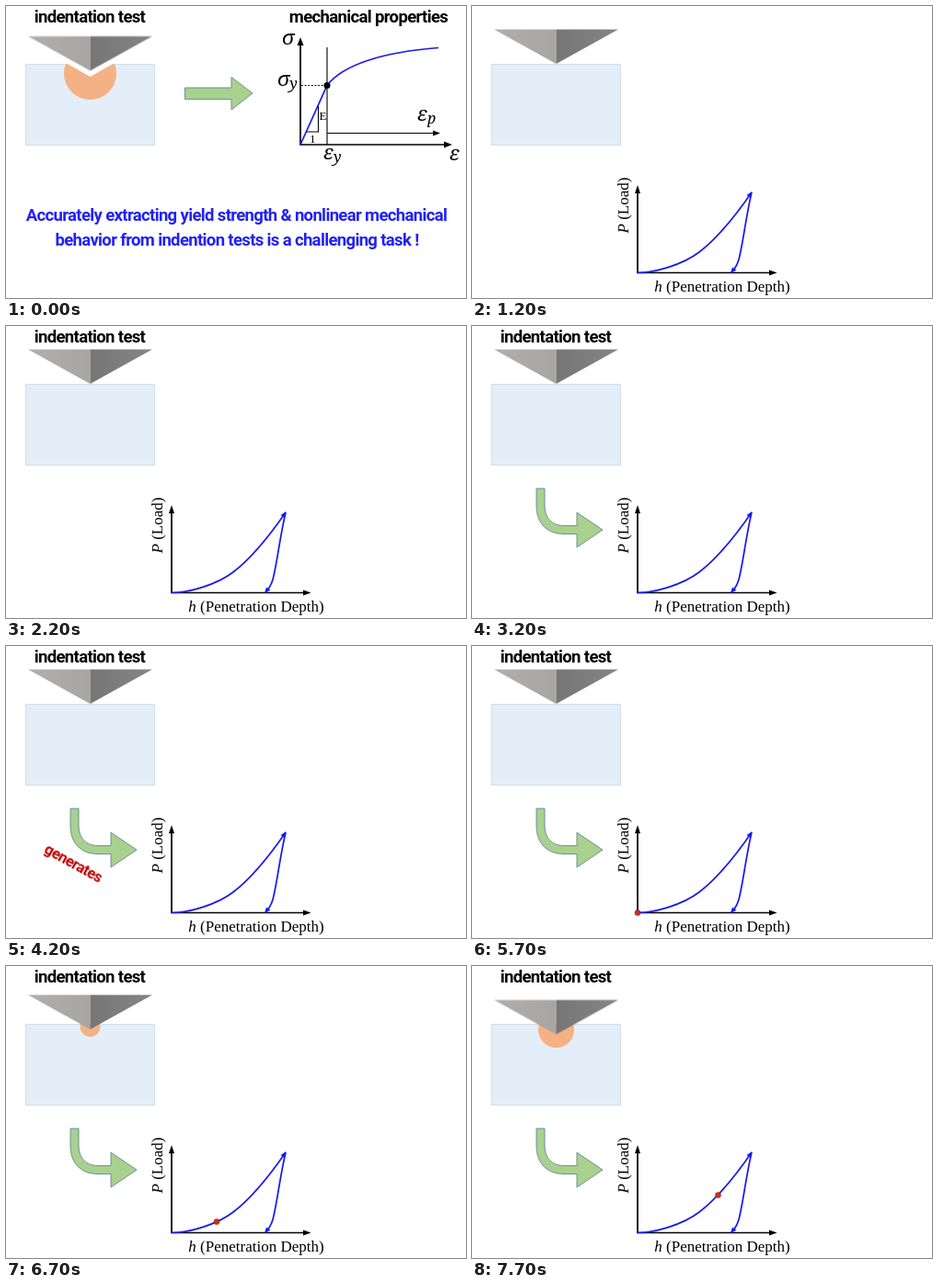
Animation, 500 px wide and 318 px high, one loop 8 s. Source, as an HTML page:

```html
<!DOCTYPE html>
<html lang="en">
<head>
<meta charset="utf-8">
<title>Indentation test</title>
<style>
  html, body { margin: 0; width: 100%; height: 100%; overflow: hidden; background: #fff; }
  svg { display: block; width: 100%; height: 100%; }
  .head { font: 700 18.5px Roboto, sans-serif; letter-spacing: -.035em; text-anchor: middle; }
  .claim { fill: #2121f5; }
  .red { font-size: 16.5px; fill: #c00000; }
  .serif { font: 17px "Liberation Serif", serif; text-anchor: middle; }
  .math { font: italic 22px "Noto Serif", serif; }
  .sub { font-size: 16px; }
  .small { font: 13px "Liberation Serif", serif; }
  .axis { fill: none; stroke: #000; stroke-width: 1.7; }
  .thin { fill: none; stroke: #000; stroke-width: 1.1; }
  .blue { fill: none; stroke: #1818f0; stroke-width: 1.7; }
  .green { fill: #a9d18e; stroke: #5f8799; stroke-width: .9; }
  .tip-blue { fill: #1818f0; }
</style>
</head>
<body>
<svg viewBox="0 0 500 318">
  <defs>
    <linearGradient id="left"><stop stop-color="#b1aeae"/><stop offset="1" stop-color="#a8a5a5"/></linearGradient>
    <linearGradient id="right"><stop stop-color="#767676"/><stop offset="1" stop-color="#858585"/></linearGradient>
    <clipPath id="inside"><rect x="21" y="63" width="141" height="89"/></clipPath>
  </defs>

  <!-- specimen and indenter -->
  <rect x="21.5" y="63.5" width="140" height="88" fill="#e4eef8" stroke="#cfdfec"/>
  <g clip-path="url(#inside)"><circle id="zone" r="1" fill="#f4b183"/></g>
  <path id="imprint" d="M65 62H118L91.5 77Z" fill="#fff"/>
  <g id="indenter">
    <path d="M24 25.5H91.5V63Z" fill="url(#left)"/>
    <path d="M91.5 25.5H159L91.5 63Z" fill="url(#right)"/>
  </g>
  <text id="title" class="head" x="91" y="18">indentation test</text>

  <!-- opening: stress and strain -->
  <g id="intro">
    <text class="head" x="394" y="18">mechanical properties</text>
    <path class="green" d="M194.500 89H245V77.500L268 95L245 113V101.500H194.500Z"/>
    <path class="axis" d="M320 40V151H479"/>
    <path d="M320 34L323.500 43H316.500ZM485 151L476 147.500V154.500Z"/>
    <path class="thin" d="M349 45V151M349 138.500H466M326 137H339.500V108"/>
    <path d="M472 138.500L464 135.500V141.500Z"/>
    <path class="thin" d="M321 86.500H347" stroke-dasharray="2 1.6"/>
    <path class="blue" d="M320 151L349 86.500C366 64 410 50 470 45.500"/>
    <circle cx="349" cy="86.500" r="3.500"/>
    <g class="math">
      <text x="300" y="42">σ</text>
      <text x="295" y="87">σ<tspan class="sub" dy="3">y</tspan></text>
      <text x="345" y="167">ε<tspan class="sub" dy="3">y</tspan></text>
      <text x="447" y="125">ε<tspan class="sub" dy="3">p</tspan></text>
      <text x="482" y="168">ε</text>
    </g>
    <text class="small" x="340.500" y="124" font-style="italic">E</text>
    <text class="small" x="330" y="149">1</text>
    <text class="head claim" x="250.500" y="234">Accurately extracting yield strength &amp; nonlinear mechanical</text>
    <text class="head claim" x="251" y="261">behavior from indention tests is a challenging task !</text>
  </g>

  <!-- load against depth -->
  <g id="graph">
    <path class="axis" d="M180 202V290.500H325"/>
    <path d="M180 195L183 204H177ZM331.500 290.500L323 287.500V293.500Z"/>
    <path class="blue" d="M180 290.500C200 290.500 230 281 247 268C268 252 286 229 304 203C298 228 294 262 290 276C288 283 286 286 282 290"/>
    <path class="tip-blue" d="M304.500 202L303 209L298.500 206ZM281 291L283 284.500L287.500 287.500Z"/>
    <text class="serif" x="272" y="311"><tspan font-style="italic">h</tspan> (Penetration Depth)</text>
    <text class="serif" transform="translate(170 217) rotate(-90)"><tspan font-style="italic">P</tspan> (Load)</text>
  </g>
  <path id="arrow" class="green" d="M70 177H79V196C79 209 87 217.500 100 217.500H114V203L142 222L114 241V226.500H100C81 226.500 70 214 70 196Z"/>
  <text id="generates" class="head red" y="5" transform="translate(73 237) rotate(29)">generates</text>
  <circle id="dot" r="3" fill="#d42a22" stroke="#8c2620" stroke-width=".8"/>
</svg>
<script>
  const LOOP = 8000;

  // Each step is [start time, value]; a value holds until the next step.
  function hold(id, property, steps) {
    const frames = steps.map(([time, value]) =>
      ({ offset: time / LOOP, [property]: value, easing: 'steps(1, end)' }));
    frames.push({ offset: 1, [property]: steps[steps.length - 1][1] });
    document.getElementById(id).animate(frames, { duration: LOOP, iterations: Infinity });
  }

  const show = (id, ...steps) => hold(id, 'opacity', steps);
  const move = (x, y) => `translate(${x}px, ${y}px)`;
  const zone = (y, r) => `${move(91.5, y)} scale(${r})`;

  show('intro', [0, 1], [1200, 0]);
  show('imprint', [0, 1], [1200, 0]);
  show('graph', [0, 0], [1200, 1]);
  show('title', [0, 1], [1200, 0], [2200, 1]);
  show('arrow', [0, 0], [3200, 1]);
  show('generates', [0, 0], [4200, 1], [5700, 0]);
  show('dot', [0, 0], [5700, 1]);

  hold('indenter', 'transform',
    [[0, move(0, 7.5)], [1200, move(0, 0)], [6700, move(0, 6)], [7700, move(0, 11.5)]]);
  hold('zone', 'transform',
    [[0, zone(73.5, 28.5)], [1200, zone(63, 0)], [6700, zone(66, 11)], [7700, zone(69.5, 19.5)]]);
  hold('dot', 'transform',
    [[0, move(180, 290.5)], [6700, move(229, 278.5)], [7700, move(267.5, 249.5)]]);
</script>
</body>
</html>
```
